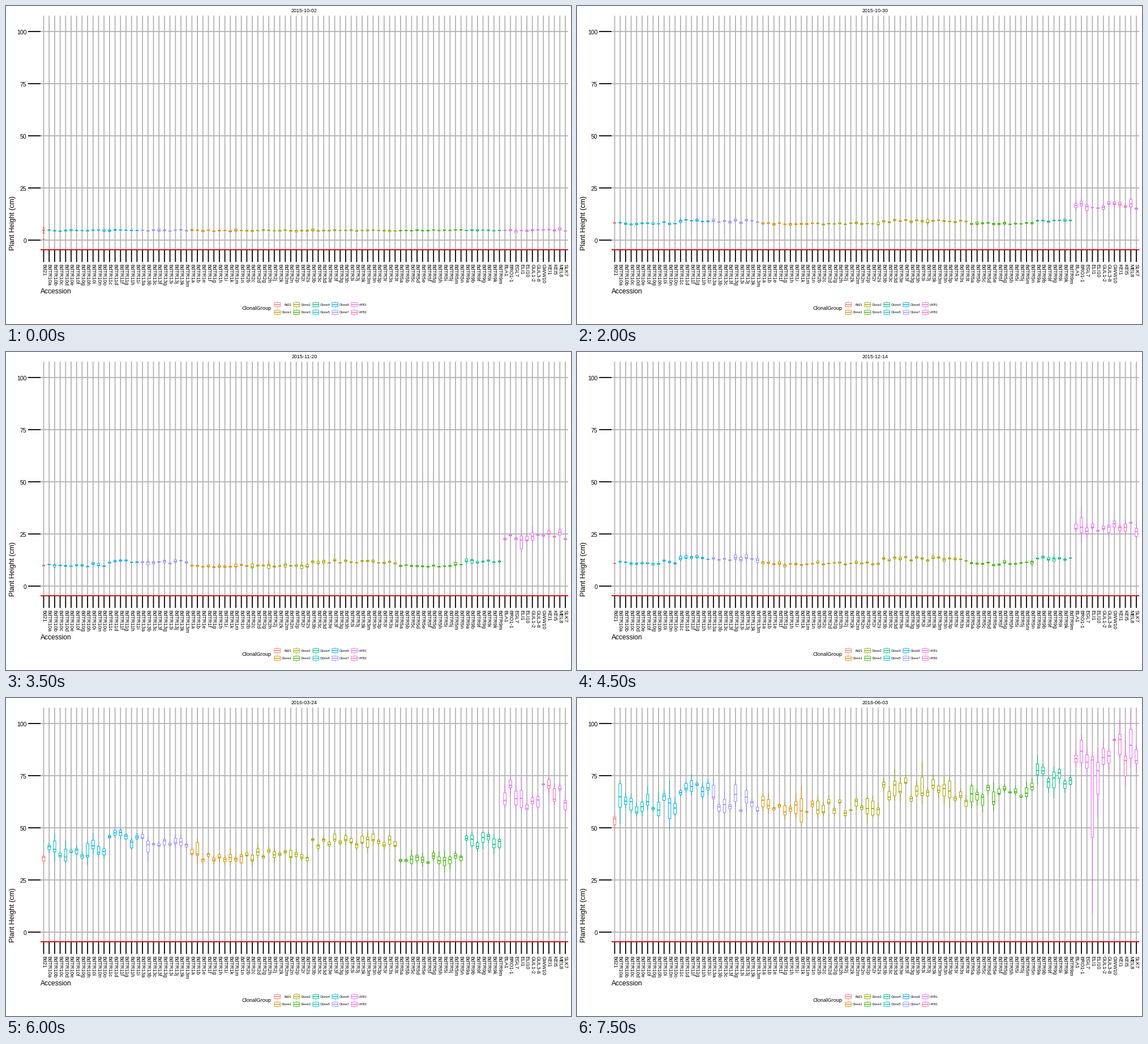
A matplotlib script for the animation above (8000 ms loop, 998 px wide and 561 px high).

```python
import numpy as np
import matplotlib.pyplot as plt
from matplotlib.animation import FuncAnimation
from matplotlib.collections import LineCollection, PolyCollection

W, H, DPI = 998, 561, 64
PX = 72 / DPI
FRAMES, INTERVAL = 16, 500
plt.rcParams["font.family"] = "Liberation Sans"

DATES = """2015-10-02 2015-10-09 2015-10-16 2015-10-23 2015-10-30 2015-11-06
2015-11-13 2015-11-20 2015-12-04 2015-12-14 2016-02-05 2016-03-04
2016-03-24 2016-04-12 2016-05-06 2016-06-03""".split()

PALETTE = {"Bd21": "#F8766D", "Clone1": "#D89000", "Clone2": "#A3A500",
           "Clone3": "#39B600", "Clone4": "#00BF7D", "Clone5": "#00BFC4",
           "Clone6": "#00B0F6", "Clone7": "#9590FF", "HYB1": "#E76BF3",
           "HYB2": "#FF62BC"}

# Line prefix, members, and mean height in December, March, April and June.
HYBRIDS = "BLA1 BRO1-1 EGL7 ELI1 ELI10 GUL1-2 GUL3-8 GWW10 KEI1 KEI5 MEL8 SLK7"
FAMILIES = [
    ("Bd21", [""], (10.5, 21, 50.5, 52)),
    ("BdTR10", "abcdefghino", (11.2, 23, 54.7, 62.5)),
    ("BdTR11", "cdfghi", (13.2, 26.5, 62.6, 67.5)),
    ("BdTR13", "abcfgijkm", (13, 29.2, 56.8, 62)),
    ("BdTR1", "abefghikmn", (10.7, 20, 52.4, 60.5)),
    ("BdTR2", "bcdghjkmnprs", (11, 20.7, 52.8, 60.2)),
    ("BdTR3", "bcdefghijkmnprst", (13, 27, 58.8, 66.6)),
    ("BdTR5", "abcdefghijmn", (10.7, 20.8, 48.5, 65.5)),
    ("BdTR9", "abfgikm", (13.2, 24.5, 61.5, 73.5)),
    ("", HYBRIDS.split(), (27.5, 52, 79, 85)),
]
CLONE = {"Bd21": "Bd21", "BdTR10": "Clone5", "BdTR11": "Clone6",
         "BdTR13": "Clone7", "BdTR1": "Clone1", "BdTR2": "Clone2",
         "BdTR3": "Clone3", "BdTR5": "Clone3", "BdTR9": "Clone4", "": "HYB1"}
CLONE["BdTR3"] = "Clone2"
START_HEIGHT = 4.6
OUTLIERS = {0: [.5, 3.6, 4.5, 5.9], 11: [34.2]}


def group_of(family, member):
    if family == "BdTR10" and member in "ino":
        return "Clone6"
    return "HYB2" if member.startswith("KEI") else CLONE[family]


names, colors, means = [], [], []
for family, members, heights in FAMILIES:
    for member in members:
        names.append(family + member)
        colors.append(PALETTE[group_of(family, member)])
        means.append(heights)
N = len(names)
xs = 66.5 + 9.7 * np.arange(N)
hybrid = np.arange(N) >= N - len(HYBRIDS.split())
vigour = np.random.default_rng(5).uniform(-1.4, 1.4, N)


def to_y(height):
    return 413 - 3.68 * np.asarray(height)


def mean_height(frame):
    """Early growth eases out until December, then runs between key dates."""
    if frame < 9:
        december = np.array([m[0] for m in means])
        return START_HEIGHT + (december - START_HEIGHT) * (frame / 9) ** .8
    return np.array([np.interp(frame, [9, 11, 13, 15], m) for m in means])


def box_stats(frame):
    """Rows of low, lower quartile, median, upper quartile, high."""
    rng = np.random.default_rng(100 + frame)
    mean = mean_height(frame)
    variation = .7 * vigour + rng.uniform(-.7, .7, N)
    median = mean * (1 + np.where(hybrid, .075, .05) * variation)
    iqr = mean * np.where(hybrid, .09, .065) * rng.gamma(2.5, .4, N)
    q1 = median - iqr * rng.uniform(.1, .8, N)
    q3 = q1 + iqr
    low = q1 - iqr * rng.uniform(.1, .9, N)
    high = q3 + iqr * rng.uniform(.1, .9, N)
    stats = np.array([low, q1, median, q3, high])
    if frame == FRAMES - 1:  # one hybrid collapses at the end
        stats[:, names.index("ELI1")] = 9, 45.5, 82.5, 84, 85.5
    return stats


fig = plt.figure(figsize=(W / DPI, H / DPI), dpi=DPI, facecolor="white")
ax = fig.add_axes([0, 0, 1, 1])
ax.set_xlim(0, W)
ax.set_ylim(H, 0)
ax.axis("off")


def lines(segments, color, width, z):
    coll = LineCollection(segments, colors=color, linewidths=width * PX,
                          capstyle="butt", zorder=z, snap=False)
    ax.add_collection(coll)
    return coll


def label(x, y, text, size, **kw):
    kw = {"ha": "center", "va": "center", **kw}
    return ax.text(x, y, text, fontsize=size * PX, color="black", **kw)


ticks = range(0, 101, 25)
lines([[(61, to_y(t)), (993, to_y(t))] for t in ticks]
      + [[(x, 17), (x, 430)] for x in xs], "#B3B3B3", 1.8, 1)
lines([[(39, to_y(t)), (61, to_y(t))] for t in ticks]
      + [[(x, 430), (x, 451.5)] for x in xs], "black", 1.8, 2)
lines([[(61, 430), (993, 430)]], "#D8000C", 1.8, 3)
for t in ticks:
    label(36.5, to_y(t) + .5, str(t), 10.5, ha="right", va="center_baseline")
for x, name in zip(xs, names):
    label(x, 455, name, 9, rotation=-90, va="top")
label(61, 504, "Accession", 12, ha="left")
label(12, 382.5, "Plant Height (cm)", 12.4, rotation=90)
title = label(527, 8.5, "", 9)

label(417, 534, "ClonalGroup", 9.2, ha="left")
for i, (group, color) in enumerate(PALETTE.items()):
    col, row = divmod(i, 2)
    x, y = 474 + 34 * col, 526.8 + 13.6 * row
    ax.add_patch(plt.Rectangle((x, y - 3.7), 10.5, 7.4, fc="white", ec=color,
                               lw=.9 * PX, snap=False))
    lines([[(x, y), (x + 10.5, y)]], color, 1.4, 3)
    lines([[(x + 5.2, y - 5.2), (x + 5.2, y - 3.7)],
           [(x + 5.2, y + 3.7), (x + 5.2, y + 5.2)]], color, .9, 3)
    label(min(x + 31, 637), y + .3, group, 5.6, ha="right")

whiskers = lines([], colors * 2, 1, 4)
boxes = PolyCollection([], facecolors="white", edgecolors=colors,
                       linewidths=1.05 * PX, zorder=5, snap=False)
ax.add_collection(boxes)
medians = lines([], colors, 1.7, 6)
dots, = ax.plot([], [], "o", color=PALETTE["Bd21"], ms=3.4 * PX, mew=0, zorder=7)


def spans(top, bottom):
    return [[(x, a), (x, b)] for x, a, b in zip(xs, top, bottom)]


def update(frame):
    low, q1, mid, q3, high = to_y(box_stats(frame))
    title.set_text(DATES[frame])
    whiskers.set_segments(spans(high, q3) + spans(q1, low))
    boxes.set_verts([[(x - 2.2, a), (x + 2.2, a), (x + 2.2, b), (x - 2.2, b)]
                     for x, a, b in zip(xs, q3, q1)])
    medians.set_segments([[(x - 2.5, m), (x + 2.5, m)] for x, m in zip(xs, mid)])
    points = OUTLIERS.get(frame, [])
    dots.set_data([xs[0]] * len(points), to_y(points))
    return title, whiskers, boxes, medians, dots


anim = FuncAnimation(fig, update, frames=FRAMES, interval=INTERVAL,
                     repeat=True, repeat_delay=0)
plt.show()
```
